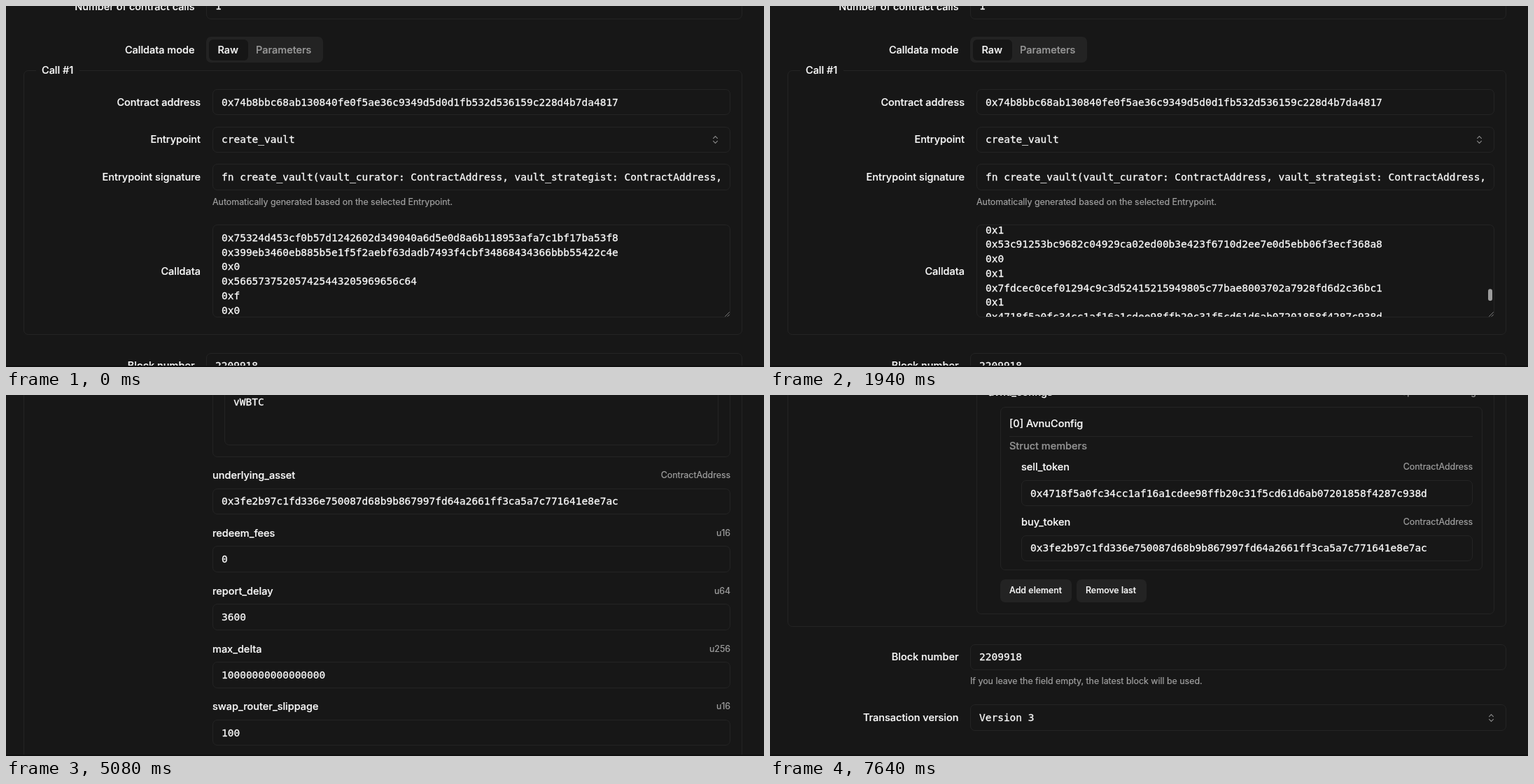
An HTML page that plays this animation: 1083x517 px, repeating every 7860 ms.

```html
<!DOCTYPE html>
<html lang="en">
<head>
<meta charset="utf-8">
<title>Contract call form</title>
<style>
  html, body { margin: 0; width: 100%; height: 100%; overflow: hidden; background: #171717; }
  #stage { position: relative; width: 1083px; height: 517px; overflow: hidden; background: #171717;
    color: #fafafa; font: 500 14.5px Inter, sans-serif; -webkit-text-stroke: .2px; }
  #stage div, #stage svg { position: absolute; box-sizing: border-box; }
  #page, .group { left: 0; top: 0; width: 1083px; }
  .text { height: 20px; line-height: 20px; white-space: pre; }
  .mono { font: 400 14.49px/20px "DejaVu Sans Mono", monospace; -webkit-text-stroke: .3px; }
  .small { font-size: 12.42px; }
  .muted { font-size: 12.42px; font-weight: 400; color: #a1a1a1; }
  .dim { color: #939393; }
  .box { border: 1px solid #242424; border-radius: 7px; }
  .clip { overflow: hidden; }
  .button { background: #232323; border-radius: 7px; }
  .pill { background: #161616; border-radius: 6px; }
  .rule { background: #242424; height: 1px; }
  .cover { background: #171717; }
  .lines { font: 400 14.49px/20.72px "DejaVu Sans Mono", monospace; white-space: pre; -webkit-text-stroke: .3px; }
  .thumb { width: 6px; height: 16.5px; border-radius: 3px; background: #9c9c9c; }
  .edge { left: 0; bottom: 0; width: 1083px; height: 2px; background: #101010; }
  svg { fill: none; stroke: #8c8c8c; }
</style>
</head>
<body>
<div id="stage"><div id="page"></div><div class="edge"></div></div>
<script>
const LOOP = 7860, STEP = 20, RIGHT = 1035, LEFT = 295, INPUT = 37.5;
const page = document.getElementById('page');

function add(parent, cls, css = {}, text = '') {
  const node = document.createElement('div');
  node.className = cls;
  for (const key in css) node.style[key] = css[key] + 'px';
  node.textContent = text;
  parent.append(node);
  return node;
}
const group = (parent, top = 0) => add(parent, 'group', { top });
const rect = (parent, cls, x, r, y, h) => add(parent, cls, { left: x, top: y, width: r - x, height: h });
const text = (parent, x, y, str, cls = '') => add(parent, 'text ' + cls, { left: x, top: y - 10 }, str);
const textEnd = (parent, r, y, str, cls = '') => add(parent, 'text ' + cls, { right: 1083 - r, top: y - 10 }, str);

function svg(parent, x, y, size, path, width) {
  const holder = add(parent, '', { left: x, top: y, width: size, height: size });
  holder.innerHTML = `<svg width="${size}" height="${size}" viewBox="0 0 24 24" stroke-width="${width}"><path d="${path}"/></svg>`;
}
const chevrons = (parent, x, y) => svg(parent, x - 6.5, y - 6.5, 13, 'm6 15 6 6 6-6M6 9l6-6 6 6', 2);

function input(parent, x, r, y, value, h = INPUT) {
  const box = rect(parent, 'box', x, r, y, h);
  const inner = add(box, 'clip', { left: 12, right: 11, top: 0, height: h - 2 });
  text(inner, 0, INPUT / 2 - 1, value, 'mono');
}

function heading(parent, x, r, y, name, type) {
  text(parent, x, y, name);
  textEnd(parent, r, y, type, 'muted');
}

function field(parent, y, name, type, value, x = LEFT, r = RIGHT) {
  heading(parent, x, r, y, name, type);
  input(parent, x, r, y + 18.5, value);
}

function button(parent, x, y, width, label) {
  const node = rect(parent, 'button', x, x + width, y, 33.2);
  text(node, 13, 16.6, label, 'small');
}

function buttons(parent, x, y, removable = true) {
  button(parent, x, y, 101.5, 'Add element');
  if (removable) button(parent, x + 109, y, 99.5, 'Remove last');
}

function byteArray(parent, y, name, value) {
  rect(parent, 'box', LEFT, RIGHT, y, 148);
  heading(parent, LEFT + 17, RIGHT - 17.5, y + 25.5, name, 'ByteArray');
  input(parent, LEFT + 17, RIGHT - 17.5, y + 51, value, 80);
}

function addressSpan(parent, y, name, value, x = LEFT, r = RIGHT) {
  const inner = x + 34, end = r - 17.5;
  rect(parent, 'box', x, r, y, value ? 175 : 96.5);
  heading(parent, x + 17, end, y + 25.5, name, 'Span<ContractAddress>');
  if (value) {
    heading(parent, inner, end, y + 56, '[0]', 'ContractAddress');
    input(parent, inner, end, y + 75, value);
  }
  buttons(parent, inner, y + (value ? 124.8 : 46.3), !!value);
}

function configSpan(parent, top, name, struct, members, itemBottom) {
  const g = group(parent, top);
  rect(g, 'box', LEFT, RIGHT, 0, itemBottom + 63.5);
  heading(g, 312, 1017, 25, name, `Span<${struct}>`);
  rect(g, 'box', 329, 1017.5, 46, itemBottom - 46);
  text(g, 342, 69.5, `[0] ${struct}`);
  rect(g, 'rule', 342, 1004, 88, 1);
  text(g, 342, 101.5, 'Struct members', 'dim');
  members.forEach(([label, type, value], i) => field(g, 132.3 + 78.7 * i, label, type, value, 359, 1004));
  buttons(g, 329, itemBottom + 13);
  return g;
}

const curator = '0x75324d453cf0b57d1242602d349040a6d5e0d8a6b118953afa7c1bf17ba53f8';
const strategist = '0x399eb3460eb885b5e1f5f2aebf63dadb7493f4cbf34868434366bbb55422c4e';
const asset = '0x3fe2b97c1fd336e750087d68b9b867997fd64a2661ff3ca5a7c771641e8e7ac';
const pool = '0x4dc4f0ca6ea4961e4c8373265bfd5317678f4fe374d76f3fd7135f57763bf28';
const debt = '0x53c91253bc9682c04929ca02ed00b3e423f6710d2ee7e0d5ebb06f3ecf368a8';
const kit = '0x7fdcec0cef01294c9c3d52415215949805c77bae8003702a7928fd6d2c36bc1';
const sell = '0x4718f5a0fc34cc1af16a1cdee98ffb20c31f5cd61d6ab07201858f4287c938d';

// Form head
textEnd(page, 269.5, 1, 'Number of contract calls');
input(page, 286, 1052, -18.5, '1');
textEnd(page, 269.5, 63, 'Calldata mode');
rect(page, 'button', 286, 452.5, 44, 37.3);
const rawPill = rect(page, 'pill', 290, 345.5, 48, 29.5);
const paramPill = rect(page, 'pill', 344.5, 449, 48, 29.5);
const rawTab = text(page, 302.5, 63, 'Raw');
const paramTab = text(page, 357, 63, 'Parameters');

const fieldset = rect(page, 'box', 25, 1052, 91.5, 379.5);
rect(page, 'cover', 43, 105, 90, 4);
text(page, 51, 92, 'Call #1');
textEnd(page, 278, 137.5, 'Contract address');
input(page, LEFT, RIGHT, 118.8, '0x74b8bbc68ab130840fe0f5ae36c9349d5d0d1fb532d536159c228d4b7da4817');
textEnd(page, 278, 191.3, 'Entrypoint');
input(page, LEFT, RIGHT, 172.5, 'create_vault');
chevrons(page, 1013, 191.3);
textEnd(page, 278, 245, 'Entrypoint signature');
input(page, LEFT, RIGHT, 226.3, 'fn create_vault(vault_curator: ContractAddress, vault_strategist: ContractAddress, name: ByteArray)');
text(page, LEFT, 280.5, 'Automatically generated based on the selected Entrypoint.', 'muted');
const calldataLabel = textEnd(page, 278, 380, 'Calldata');

// Raw calldata
const raw = group(page);
const area = rect(raw, 'box clip', LEFT, RIGHT, 313.3, 132.3);
const lines = add(area, 'lines', { left: 12, top: 7.7 }, [
  curator, strategist, '0x0', '0x566573752057425443205969656c64', '0xf',
  '0x0', '0x7657425443', '0x5', asset, '0x0', '0xe10', '0x2386f26fc10000', '0x0',
  '0x64', '0xe10', '0x1', '0x1', pool, asset, '0x1', debt, '0x0', '0x1', kit, '0x1', sell, asset
].join('\n'));
const thumb = add(raw, 'thumb', { left: 1026, top: 316 });
svg(raw, 1027, 438, 7, 'M1 23 23 1M13 23 23 13', 3);

// Decoded parameters
const params = group(page);
field(params, 332, 'vault_curator', 'ContractAddress', curator);
field(params, 414.9, 'vault_strategist', 'ContractAddress', strategist);
byteArray(params, 487.5, 'name', 'WBTC Yield Vault');
byteArray(params, 652.5, 'symbol', 'vWBTC');
[
  ['underlying_asset', 'ContractAddress', asset],
  ['redeem_fees', 'u16', '0'],
  ['report_delay', 'u64', '3600'],
  ['max_delta', 'u256', '10000000000000000'],
  ['swap_router_slippage', 'u16', '100'],
  ['swap_router_period', 'u64', '3600'],
  ['swap_router_allowed_calls_per_period', 'u64', '1']
].forEach(([name, type, value], i) => field(params, 827 + 82.85 * i, name, type, value));
const lending = configSpan(params, 1397, 'vesu_v1_configs', 'VesuV1Config',
  [['pool_id', 'felt252', pool], ['collateral_asset', 'ContractAddress', asset]], 467.3);
addressSpan(lending, 279.3, 'debt_assets', debt, 359, 1004);
addressSpan(params, 1944.5, 'erc4626_strategies', '');
addressSpan(params, 2058, 'starknet_vault_kit_strategies', kit);
configSpan(params, 2250, 'avnu_configs', 'AvnuConfig',
  [['sell_token', 'ContractAddress', sell], ['buy_token', 'ContractAddress', asset]], 279.8);

// Form foot
const foot = group(page);
textEnd(foot, 269.5, 515, 'Block number');
input(foot, 286, 1052, 496.5, '2209918');
text(foot, 286, 550.3, 'If you leave the field empty, the latest block will be used.', 'muted');
textEnd(foot, 269.5, 602, 'Transaction version');
input(foot, 286, 1052, 583.3, 'Version 3');
chevrons(foot, 1030.5, 602);

// Each track is a list of [ms, value], joined by a monotone cubic curve.
const textScroll = [[540, 0], [760, 50], [1060, 150], [1360, 225.2], [1660, 315], [1780, 315], [1940, 405], [2100, 445]];
const thumbFade = [[540, 0], [580, 1], [2380, 1], [2720, .13], [3540, .13], [3580, 0]];
const pageScroll = [[4620, 0], [4640, 2], [4760, 90], [5000, 560], [5220, 940], [5420, 1115], [5500, 1140],
  [5720, 1370], [5940, 1610], [6080, 1698], [6100, 1698], [6200, 2110], [6260, 2220], [6440, 2279]];

function sample(track, t) {
  const last = track.length - 1;
  if (t <= track[0][0]) return track[0][1];
  if (t >= track[last][0]) return track[last][1];
  const slope = i => i < 0 || i >= last ? 0 : (track[i + 1][1] - track[i][1]) / (track[i + 1][0] - track[i][0]);
  const tangent = i => {
    const a = slope(i - 1), b = slope(i);
    return a * b > 0 ? 2 * a * b / (a + b) : 0;
  };
  const i = track.findIndex(p => p[0] > t) - 1;
  const span = track[i + 1][0] - track[i][0], u = (t - track[i][0]) / span, v = 1 - u;
  return track[i][1] * (1 + 2 * u) * v * v + track[i + 1][1] * u * u * (3 - 2 * u)
    + span * u * v * (tangent(i) * v - tangent(i + 1) * u);
}

function draw() {
  const t = Math.floor(performance.now() % LOOP / STEP) * STEP;
  const decoded = t >= 3580;
  const mix = Math.min(1, Math.max(0, (t - 3540) / 160));
  const scroll = sample(textScroll, t);

  page.style.transform = `translateY(${-Math.round(sample(pageScroll, t))}px)`;
  lines.style.transform = `translateY(${-scroll}px)`;
  thumb.style.transform = `translateY(${scroll / 445 * 98}px)`;
  thumb.style.opacity = sample(thumbFade, t);

  rawPill.style.opacity = 1 - mix;
  paramPill.style.opacity = mix;
  rawTab.style.opacity = 1 - .45 * mix;
  paramTab.style.opacity = .55 + .45 * mix;

  raw.style.display = decoded ? 'none' : '';
  params.style.display = decoded ? '' : 'none';
  fieldset.style.height = (decoded ? 2519 : 379.5) + 'px';
  calldataLabel.style.top = (decoded ? 1444 : 370) + 'px';
  foot.style.top = (decoded ? 2139 : 0) + 'px';
  requestAnimationFrame(draw);
}
draw();
</script>
</body>
</html>
```
